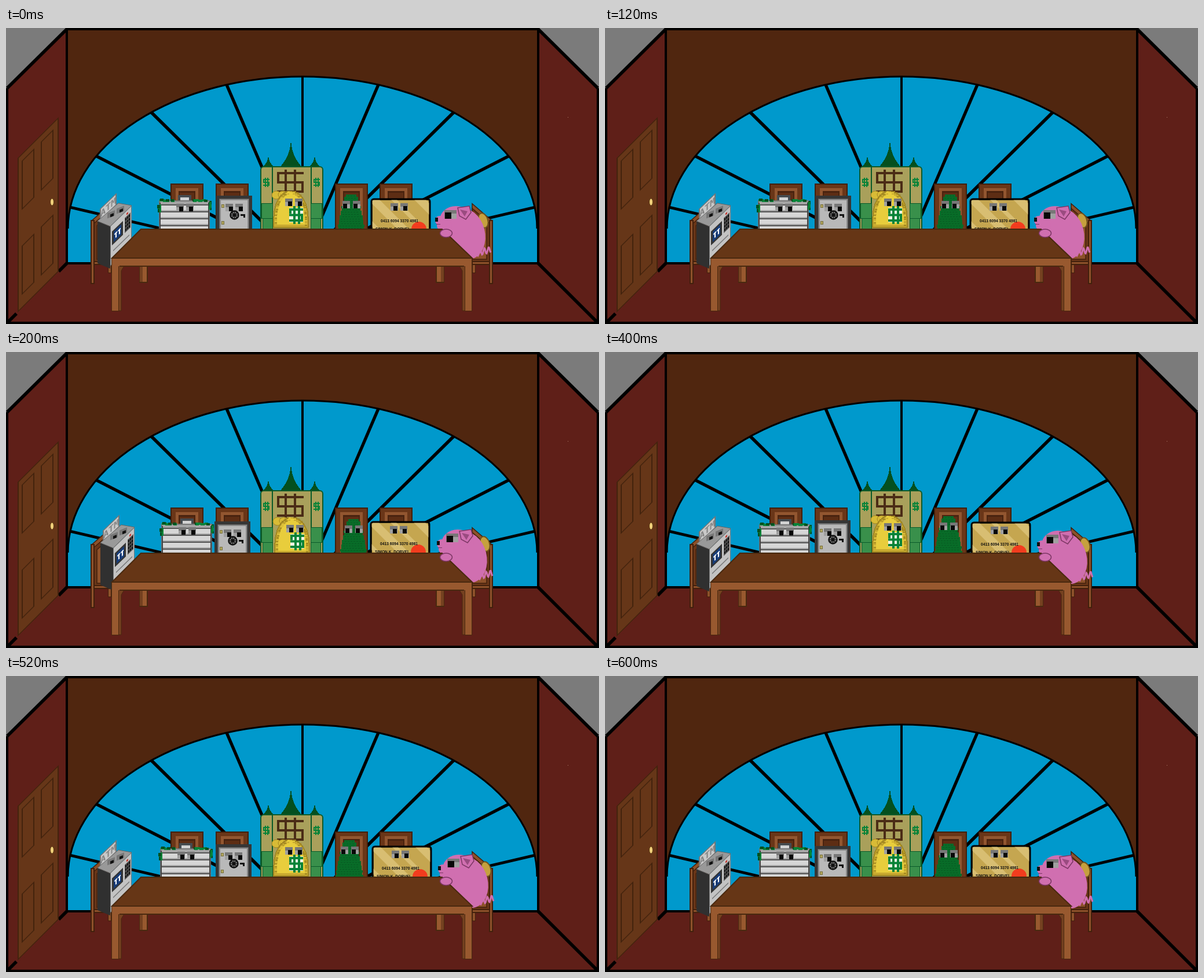
Animation, 1024 px wide and 512 px high, one loop 800 ms. Source, as an HTML page with a canvas:

```html
<!DOCTYPE html>
<html lang="en">
<head>
<meta charset="utf-8">
<title>Money meeting</title>
<style>
html, body { margin: 0; width: 100%; height: 100%; overflow: hidden; background: #7b7b7b; }
canvas { display: block; width: 1024px; height: 512px; }
</style>
</head>
<body>
<canvas id="stage" width="1024" height="512"></canvas>
<script>
const ctx = document.getElementById('stage').getContext('2d');
const STEP = 200;
const GREEN = '#078338', DEEP = '#04501f';

function rect(color, x, y, w, h) {
  ctx.fillStyle = color;
  ctx.fillRect(x, y, w, h);
}

function box(fill, edge, x, y, w, h, t = 2) {
  rect(edge, x, y, w, h);
  rect(fill, x + t, y + t, w - 2 * t, h - 2 * t);
}

function paint(fill, edge, width = 2) {
  if (fill) { ctx.fillStyle = fill; ctx.fill(); }
  if (edge) { ctx.strokeStyle = edge; ctx.lineWidth = width; ctx.stroke(); }
}

function poly(fill, pts, edge, width) {
  ctx.beginPath();
  for (let i = 0; i < pts.length; i += 2) ctx.lineTo(pts[i], pts[i + 1]);
  ctx.closePath();
  paint(fill, edge, width);
}

function oval(fill, x, y, rx, ry, edge, width, turn = 0) {
  ctx.beginPath();
  ctx.ellipse(x, y, rx, ry, turn, 0, Math.PI * 2);
  paint(fill, edge, width);
}

// A square pen is wider on slanted strokes
function pen(color, size, x1, y1, x2, y2) {
  const dx = Math.abs(x2 - x1), dy = Math.abs(y2 - y1);
  ctx.beginPath();
  ctx.moveTo(x1, y1);
  ctx.lineTo(x2, y2);
  paint(null, color, size * (dx + dy) / Math.hypot(dx, dy));
}

function within(change, draw) {
  ctx.save();
  change();
  draw();
  ctx.restore();
}

const mirror = (axis, draw) => within(() => ctx.transform(-1, 0, 0, 1, axis * 2, 0), draw);
const slant = (x, y, slope, draw) => within(() => ctx.transform(1, slope, 0, 1, x, y), draw);

function both(axis, draw) {
  draw();
  mirror(axis, draw);
}

function random(seed) {
  return () => (seed = (seed * 16807) % 2147483647) / 2147483647;
}

// Stacks rows whose half width depends on the height, u = 0..1
function stack(color, cx, top, bottom, half, row = 2) {
  for (let y = top; y < bottom; y += row) {
    const r = Math.round(half((y - top) / (bottom - top)));
    rect(color, cx - r, y, r * 2, row);
  }
}

function dollar(color, x, y, w, h, t) {
  const mid = (h - t) / 2;
  for (let k = 0; k < 3; k++) rect(color, x, y + k * mid, w, t);
  rect(color, x, y, t, mid);
  rect(color, x + w - t, y + mid, t, mid);
  for (const k of [0.29, 0.62]) rect(color, Math.round(x + w * k), y - t, t, h + t * 2);
}

function eyes(x, y, gap, look) {
  for (const ex of [x, x + gap]) {
    rect('#777', ex, y, 13, 13);
    rect('#a0a0a0', ex, y + 6, 13, 7);
    rect('#080808', ex + look, y + 5, 7, 8);
  }
}

function room() {
  const wall = '#5f1f18';
  rect('#7b7b7b', 0, 0, 1024, 512);
  both(512, () => poly(wall, [105, 2, 105, 407, 2, 510, 2, 104]));
  poly(wall, [105, 407, 919, 407, 1022, 510, 2, 510]);
  rect('#50260f', 105, 2, 814, 405);

  ctx.beginPath();
  ctx.ellipse(512, 347, 405, 263, 0, Math.PI, Math.PI * 2);
  paint('#0099cc', '#000', 3);
  rect('#0099cc', 107, 347, 810, 60);
  pen('#000', 4, 512, 83, 512, 405);
  both(512, () => {
    for (const dx of [131, 261, 356, 401]) {
      const y = 347 - 263 * Math.sqrt(1 - (dx / 405) ** 2);
      pen('#000', 4, 512 - dx, y, 512, 404);
    }
    pen('#000', 4, 105, 2, 2, 104);
    pen('#000', 4, 2, 104, 2, 511);
    pen('#000', 4, 2, 510, 105, 407);
    for (const y of [2, 407]) pen('#000', 4, 103, y, 512, y);
    pen('#000', 4, 105, 0, 105, 409);
    pen('#000', 4, 0, 510, 512, 510);
  });
  pen(wall, 6, 18, 494, 91, 421);
  rect('#b08070', 970, 154, 1, 1);
}

function door() {
  const edge = '#43230d';
  slant(20, 225, -1, () => {
    box('#663618', edge, 0, 0, 71, 267);
    for (const x of [7, 40]) {
      for (const y of [12, 159]) box('#663618', edge, x, y, 22, 85);
    }
  });
  oval('#f3d27c', 79.5, 301, 3, 6, '#5a3a12', 1);
}

function chair(x) {
  box('#6a3618', '#42200c', x, 269, 57, 80);
  box('#49230f', '#925630', x + 9, 277, 39, 72, 5);
  rect('#5d2d14', x + 16, 285, 25, 64);
}

function sideChair() {
  const edge = '#42200c', wood = '#8d512a';
  box(wood, edge, 176, 408, 6, 16, 1);
  [wood, '#6a3618', wood].forEach((fill, k) => {
    const x = 147 + 5 * k, top = 334 + 4 * k, low = 408 - 4 * k;
    poly(fill, [x, top, 182, top - 30 + 4 * k, 182, low, x, low], edge, 1.5);
  });
  box(wood, edge, 146, 403, 37, 7);
  box(wood, edge, 146, 332, 7, 111);
}

function throne() {
  const spire = (x, top, half) => stack(DEEP, x, top, 241, (u) => half * (0.2 * u + 0.8 * u ** 2.6), 1);
  spire(492, 193, 20);
  spire(453, 220, 11);
  spire(533, 220, 11);
  ctx.beginPath();
  ctx.roundRect(440, 240, 107, 115, 5);
  paint('#a9a05b', '#0a5a2a', 2);
  both(493.5, () => {
    rect('#0a5a2a', 459, 241, 2, 107);
    box('#39904b', '#0a5a2a', 441, 303, 20, 27, 1);
    box('#39904b', '#0a5a2a', 443, 329, 18, 26, 1);
  });
  for (const x of [444, 531]) dollar(GREEN, x, 261, 11, 12, 2);
  dollar('#4b2c16', 468, 249, 46, 36, 4);
}

function atm() {
  for (const x of [168, 185]) rect('#555', x, 497 - x, 2, 16);
  slant(162, 313, -0.96, () => {
    box('#c9c9c9', '#777', 0, 0, 29, 21);
    ctx.fillStyle = '#858585';
    ctx.font = 'bold 15px "DejaVu Sans Mono", monospace';
    ctx.fillText('ATM', 1, 16);
  });
  slant(158, 334, 0.42, () => rect('#303030', 0, 0, 22, 73));
  poly('#999', [158, 334, 194, 303, 217, 307, 180, 343], '#666', 1);
  for (const x of [175, 191]) {
    slant(x, 415 - x / 2, -0.4, () => {
      rect('#777', 0, -7, 13, 9);
      rect('#111', 5, -3, 6, 5);
    });
  }
  slant(180, 343, -0.97, () => {
    box('#c3c3c3', '#777', 0, 0, 37, 69, 1);
    box('#173c78', '#333', 3, 12, 19, 24, 3);
    for (const x of [7, 13]) {
      rect('#fff', x, 20, 5, 2);
      rect('#fff', x + 2, 20, 2, 9);
    }
    rect('#555', 25, 10, 10, 26);
    for (let i = 0; i < 12; i++) rect('#111', 26 + (i % 3) * 3, 12 + Math.floor(i / 3) * 6, 2, 4);
    rect('#c52b22', 28, 5, 3, 3);
    rect('#777', 5, 46, 28, 2);
  });
}

function briefcase() {
  box('#d2d2d2', '#454b50', 297, 289, 23, 14, 4);
  box('#a5a5a5', '#777', 264, 298, 88, 58);
  for (let y = 305; y < 348; y += 12) {
    rect('#555', 267, y, 82, 2);
    rect('#d6d6d6', 267, y + 2, 82, 8);
  }
  for (const x of [265, 349]) rect('#444', x, 302, 2, 50);
  const rnd = random(11);
  const bill = (x, y, w, h) => rect(rnd() < 0.6 ? GREEN : DEEP, Math.round(x), Math.round(y), w, h);
  for (let i = 0; i < 9; i++) {
    bill(265 + rnd() * 20, 295 + rnd() * 2, 6, 4);
    bill(322 + rnd() * 20, 295 + rnd() * 2, 6, 4);
    bill(261 + rnd() * 4, 302 + rnd() * 11, 3, 6);
    bill(349 + rnd() * 4, 299 + rnd() * 11, 3, 6);
  }
  eyes(294, 304, 17, 5);
}

function safe() {
  box('#5b5b5b', '#363636', 363, 290, 62, 66, 5);
  box('#b9b9b9', '#8a8a8a', 369, 296, 50, 60);
  for (const y of [305, 334]) box('#b2a65c', '#777040', 372, y, 5, 6, 1);
  eyes(379, 304, 17, 6);
  oval('#777', 394.5, 323.5, 7, 7, '#111', 2.5);
  for (let a = 0; a < Math.PI; a += Math.PI / 4) {
    const c = Math.cos(a) * 7, s = Math.sin(a) * 7;
    pen('#111', 1, 394.5 - c, 323.5 - s, 394.5 + c, 323.5 + s);
  }
  oval('#111', 394.5, 323.5, 3, 3);
  rect('#111', 405, 322, 8, 3);
  rect('#111', 410, 323, 3, 5);
}

function bag() {
  const half = (u) => 31 * Math.sqrt(1 - (1 - u) ** 3);
  oval('#d8bb36', 467, 289, 8, 7, '#a18622', 1);
  oval('#d8bb36', 478, 288, 8, 6, '#a18622', 1);
  stack('#a18622', 492, 280, 346, half);
  stack('#c9ab30', 492, 282, 344, (u) => half(u) - 2);
  const rnd = random(37);
  for (let i = 0; i < 70; i++) {
    const u = rnd(), side = rnd() < 0.5 ? -1 : 1;
    rect(rnd() < 0.5 ? '#a88d22' : '#dcc03a', Math.round(490 + side * (half(u) - 5)), Math.round(282 + u * 60), 4, 2);
  }
  stack('#e8cd3c', 492, 284, 340, (u) => half(u) - 7);
  eyes(482, 295, 17, 5);
  rect('#f2f4e4', 489, 311, 24, 25);
  dollar(GREEN, 489, 312, 24, 23, 4);
}

function cash() {
  const half = (u) => 9 + 16 * u ** 0.7;
  stack('#086c28', 596, 288, 360, (u) => half(u) + Math.round(u * 18) % 2, 4);
  for (let y = 290; y < 350; y += 4) {
    const r = half((y - 288) / 72) - 2;
    for (let x = 596 - r + y % 3; x < 594 + r; x += 5) rect('#075a22', Math.round(x), y, 3, 1);
  }
  eyes(581, 299, 18, 1);
}

function card() {
  ctx.beginPath();
  ctx.roundRect(631, 296, 101, 66, 4);
  paint('#c5a650', '#000', 3);
  within(() => ctx.clip(), () => {
    for (let k = 0; k < 4; k++) {
      const x = 585 + k * 40, w = 10 + (k % 2) * 10;
      poly('#d8be72', [x, 297, x + w, 297, x + w + 62, 359, x + 62, 359]);
    }
    oval('#f23c1e', 713, 348, 13, 13);
    ctx.beginPath();
    ctx.roundRect(631, 296, 101, 66, 4);
    paint(null, '#000', 3);
    ctx.fillStyle = '#111';
    ctx.font = 'bold 6.7px "Liberation Sans", Arial, sans-serif';
    ctx.fillText('0413 6094 3370 4981', 647, 336);
    ctx.fillText('SIMON K. DORVEL', 638, 350);
  });
  eyes(664, 303, 17, 5);
}

function pig() {
  const pink = '#d06fb0', dark = '#7d3765';
  ctx.beginPath();
  for (let x = 814; x < 838; x++) ctx.lineTo(x, 389 - (x - 814) * 0.25 + 5 * Math.sin(x * 0.85));
  paint(null, pink, 3);
  oval('#c6a03e', 824, 333, 8, 13, '#6e521d', 2, -0.3);
  oval(pink, 793, 356, 34, 45, null, 0, -0.25);
  oval(pink, 777, 332, 28, 24);
  oval(pink, 749, 333, 8, 8);
  oval(pink, 757, 342, 13, 10);
  rect('#111', 741, 328, 5, 7);
  rect(dark, 743, 339, 7, 1);
  rect('#777', 757, 315, 21, 15);
  rect('#a0a0a0', 769, 321, 9, 9);
  rect('#080808', 758, 319, 11, 11);
  poly(pink, [780, 311, 800, 308, 803, 319, 794, 331, 783, 325], dark, 1.5);
  poly('#9a4b80', [784, 314, 797, 317, 792, 326]);
}

function hoof() {
  oval('#d06fb0', 760, 355, 10.5, 7, '#7d3765', 1.5);
}

function table() {
  const edge = '#49290f', light = '#98592f', shade = '#754120';
  both(493.5, () => {
    box(light, edge, 230, 410, 15, 31);
    rect(shade, 231, 411, 5, 28);
    poly(shade, [193, 410, 205, 410, 199, 420, 199, 489, 193, 489], edge, 1);
    box(light, edge, 182, 398, 13, 92, 1);
  });
  poly('#663616', [233, 348, 753, 348, 805, 398, 183, 398], edge, 2);
  rect(light, 183, 399, 621, 13);
  rect(edge, 196, 411, 595, 2);
}

// Each one jolts by "kick", then drifts off and bobs before the loop restarts
function sway(draw, step, kick, drift, bob) {
  const [x, y] = step === 0 ? [0, 0] : step === 1 ? kick : drift;
  const lift = step === 2 ? -bob : step === 3 ? bob : 0;
  within(() => ctx.translate(x, y + lift), draw);
}

function render(ms) {
  const step = Math.floor(ms / STEP) % 4;
  room();
  door();
  within(() => {
    ctx.beginPath();
    ctx.rect(0, 0, 1024, 348);
    ctx.clip();
  }, () => {
    for (const x of [284, 362, 568, 645]) chair(x);
    throne();
    sway(briefcase, step, [4, -1], [2, 0], 0);
    sway(safe, step, [-3, 3], [-1, 2.5], 1.5);
    sway(bag, step, [2, 4], [0, 0.5], -0.5);
    sway(cash, step, [4, 1], [-3, -1], 3);
    sway(card, step, [-1, -2], [2, -1.5], -0.5);
  });
  both(493.5, sideChair);
  sway(atm, step, [5, -4], [0, -1], 1);
  sway(pig, step, [3, -1], [5, 1.5], 0.5);
  table();
  hoof();
}

const start = performance.now();
function tick() {
  render(performance.now() - start);
  requestAnimationFrame(tick);
}
tick();
</script>
</body>
</html>
```
